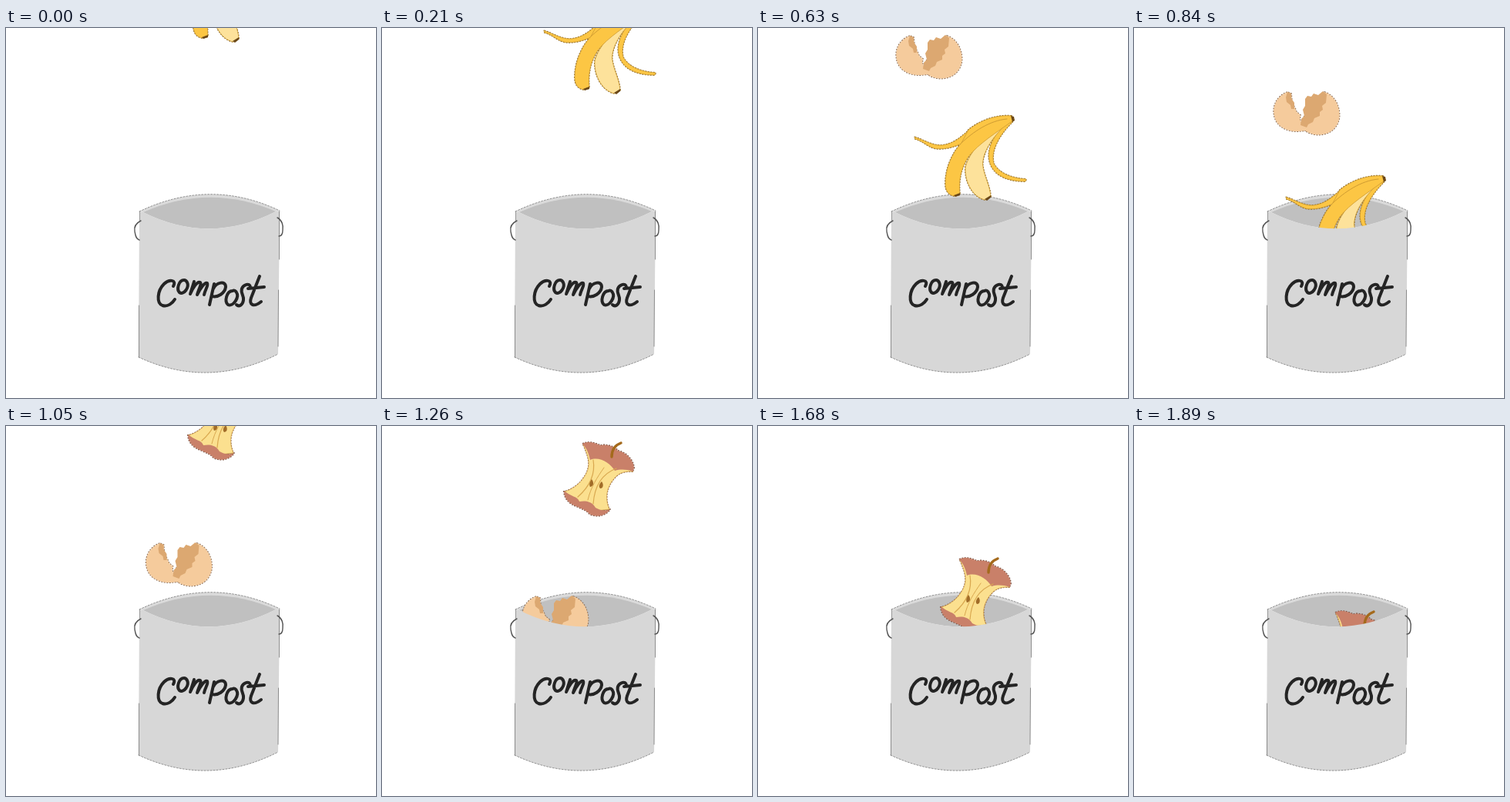
An HTML page with a canvas that plays this animation: 480x480 px, repeating every 2.1 s.

```html
<!DOCTYPE html>
<html lang="en">
<head>
<meta charset="utf-8">
<title>Compost</title>
<style>
  html, body { margin: 0; width: 100%; height: 100%; overflow: hidden; background: #fff; }
  canvas { display: block; width: 480px; height: 480px; }
</style>
</head>
<body>
<canvas id="stage" width="480" height="480" role="img" aria-label="Compost"></canvas>
<script>
const ctx = document.getElementById('stage').getContext('2d');
const STEP = 210;
const STEPS = 10;

function fill(path, color) {
  ctx.fillStyle = color;
  ctx.fill(new Path2D(path));
}

function line(path, color, width, dash = []) {
  ctx.setLineDash(dash);
  ctx.strokeStyle = color;
  ctx.lineWidth = width;
  ctx.stroke(new Path2D(path));
  ctx.setLineDash([]);
}

// The dotted outline lies beneath all parts, so it shows only around the silhouette.
function drawParts(parts, outline) {
  ctx.lineCap = 'butt';
  for (const [path] of parts) line(path, outline, 1.8, [2, 1.5]);
  ctx.lineCap = 'round';
  for (const [path, color, edge] of parts) {
    fill(path, color);
    if (edge) line(path, edge, .8);
  }
}

function drawBanana() {
  const yellow = '#fcc644', edge = '#cf9c32', tip = '#6b4818';
  const sidePeel = 'M327 58 C313 69 302 86 303.5 103 C306 121 321 133 351 133 L352 130 ' +
    'C334 129 317 123 310 110 C306 95 314 76 334 56 Z';
  const thinPeel = 'M207.5 75.5 C219 79 230 87 243 86 C258 84 267 76 278 66 L282 76 ' +
    'C264 88 248 92 234 90.5 C222 87 219 81 208 78 Z';
  const innerPeel = 'M322 61 C302 68 277 96 273 115 C272 134 283 154 299 157 L306 153 ' +
    'C305 138 297 126 295.5 111 C296 93 309 75 325 60 Z';
  const frontPeel = 'M333 48 C313 46 292 54 277 66 L268 83 C255 97 247 117 247 136 ' +
    'C247 146 252 151 259 152 L266 150 C264 133 267 116 277 101 ' +
    'C290 84 313 70 335 54 Z';
  drawParts([
    [sidePeel, yellow, edge], [thinPeel, yellow, edge],
    [innerPeel, '#fde29b', edge], [frontPeel, yellow, edge]
  ], '#80612a');
  line('M327 52 C304 54 283 69 268 83', edge, 1);
  fill('M332 48 L336 49 L337 54 L334 56 Z', tip);
  fill('M258 151 L266 148 L266 151 L260 153 Z', tip);
  fill('M298 156 L306 151 L306 154 L301 158 Z', tip);
}

function drawEgg() {
  const shell = '#f5cb9c', inside = '#dca871';
  drawParts([
    ['M197 10 C184 15 178 27 179.5 38 C181 54 196 62 212 61 L222 60 ' +
     'L217 54 L213 45 L214 40 L209 36 L207 31 L203 24 L202 12 Z', shell],
    ['M245 10 C259 15 265 29 264.5 42 C263 57 251 66 236 65.5 ' +
     'C228 65 221 62 214 55 L218 43 L232 23 Z', shell]
  ], '#8d6e55');
  fill('M197 10 L202 12 L202 18 L206 24 L206 32 L202 32 L201 27 L196 23 L195 17 Z', inside);
  fill('M220 19 L223 15 L228 16 L231 12 L237 14 L243 9 L248 13 L247 24 L242 28 ' +
       'L243 33 L239 36 L239 41 L232 44 L230 49 L224 52 L222 56 L214 53 ' +
       'L215 45 L219 41 L217 33 L220 28 Z', inside);
}

function drawApple() {
  const skin = '#c98069', flesh = '#fbe08f', vein = '#d9a850', brown = '#a16c28';
  drawParts([
    ['M261 96 C269 114 272 125 261 140 C254 150 244 155 237 157 L250 167 ' +
     'L278 182 L295 180 C288 164 292 149 304 137 C312 130 321 131 326 131 ' +
     'L298 113 Z', flesh, vein],
    ['M260 95 C268 91 276 94 283 97 C290 95 302 98 306 104 C317 106 327 117 327 127 ' +
     'L325 131 C317 128 309 128 302 130 C296 120 282 111 270 116 C268 107 266 102 260 95 Z', skin],
    ['M236 156 C236 165 242 173 254 177 C260 180 265 181 269 186 ' +
     'C278 191 290 189 296 180 C289 183 282 181 277 178 C272 169 263 169 256 170 ' +
     'C254 163 245 164 236 156 Z', skin]
  ], '#7d5545');
  line('M274 116 C277 134 270 150 254 164', vein, 1.2);
  line('M304 127 C288 133 276 146 274 173', vein, 1.2);
  line('M288 126 C279 139 271 151 267 168', vein, 1);
  fill('M272 141 C275 145 275 150 270 151 C268 148 270 144 272 141 Z', brown);
  fill('M285 144 C288 148 287 153 283 153 C280 150 283 146 285 144 Z', brown);
  line('M298 112 C298 103 302 97 310 94', '#a46a1c', 3.4);
}

function drawBack() {
  const rim = 'M173 238 Q265 194 355 237';
  fill(rim + ' L350 238 Q264 282 178 239 Z', '#dadada');
  line(rim, '#777', .8, [2, 2]);
  fill('M178 239 Q264 201 350 238 Q264 282 178 239 Z', '#c0c0c0');
}

function drawFront() {
  const base = 'M172 427 Q262 469 353 423';
  fill('M173 238 L178 239 Q264 282 350 238 L355 237 L353 423 Q262 469 172 427 Z', '#d7d7d7');
  line(base, '#777', .8, [2, 2]);
  line('M354.5 238 V300 M353.5 340 L353 413 M172.5 360 V427', '#777', .8);
  line('M173.5 238 V250', '#888', .8);
  line('M175 250 C167 254 166 259 167 264 C168 270 169 274 173 275', '#555', 1.4);
  line('M352 246 C358 249 360 256 359 262 C359 267 357 270 354 270', '#555', 1.4);
}

function drawLettering() {
  const letters = [
    'M217 335 C222 326 211 326 205 332 C196 341 195 357 203 360 C210 362 216 357 219 352',
    'M231 327 C224 327 221 339 225 343 C231 347 238 336 235 330 C234 328 233 327 231 327',
    'M244 329 L239 345 C242 338 248 328 252 330 C254 332 250 339 248 346 ' +
      'C252 338 258 329 261 331 C263 334 258 340 257 346',
    'M270 332 L264 359 M269 338 C273 330 285 327 285 336 C284 344 275 350 267 348',
    'M294 341 C286 341 283 355 288 359 C295 362 303 349 299 343 C298 341 296 340 294 341',
    'M317 336 C316 330 308 333 306 338 C304 344 309 347 308 353 C307 360 302 362 299 359',
    'M329 322 L318 350 C315 359 321 363 331 355 M314 338 L335 336'
  ];
  for (const letter of letters) line(letter, '#242424', 4);
}

// Each item drops one position per step, starting at its own step.
const items = [
  { draw: drawBanana, start: 0, path: [[-4, -139], [3, -72], [0, 0], [-4, 66], [-10, 144]] },
  { draw: drawEgg, start: 3, path: [[0, 0], [2, 73], [2.5, 142], [3, 211]] },
  { draw: drawApple, start: 5, path: [[0, -145], [0, -72], [0, 0], [1, 78], [1, 147]] }
];

function render(now) {
  const step = Math.floor(now / STEP) % STEPS;
  ctx.fillStyle = '#fff';
  ctx.fillRect(0, 0, 480, 480);
  ctx.lineCap = ctx.lineJoin = 'round';
  drawBack();
  for (const { draw, start, path } of items) {
    const offset = path[step - start];
    if (!offset) continue;
    ctx.save();
    ctx.translate(...offset);
    draw();
    ctx.restore();
  }
  drawFront();
  drawLettering();
}

const startTime = performance.now();
function tick() {
  render(performance.now() - startTime);
  requestAnimationFrame(tick);
}
tick();
</script>
</body>
</html>
```
